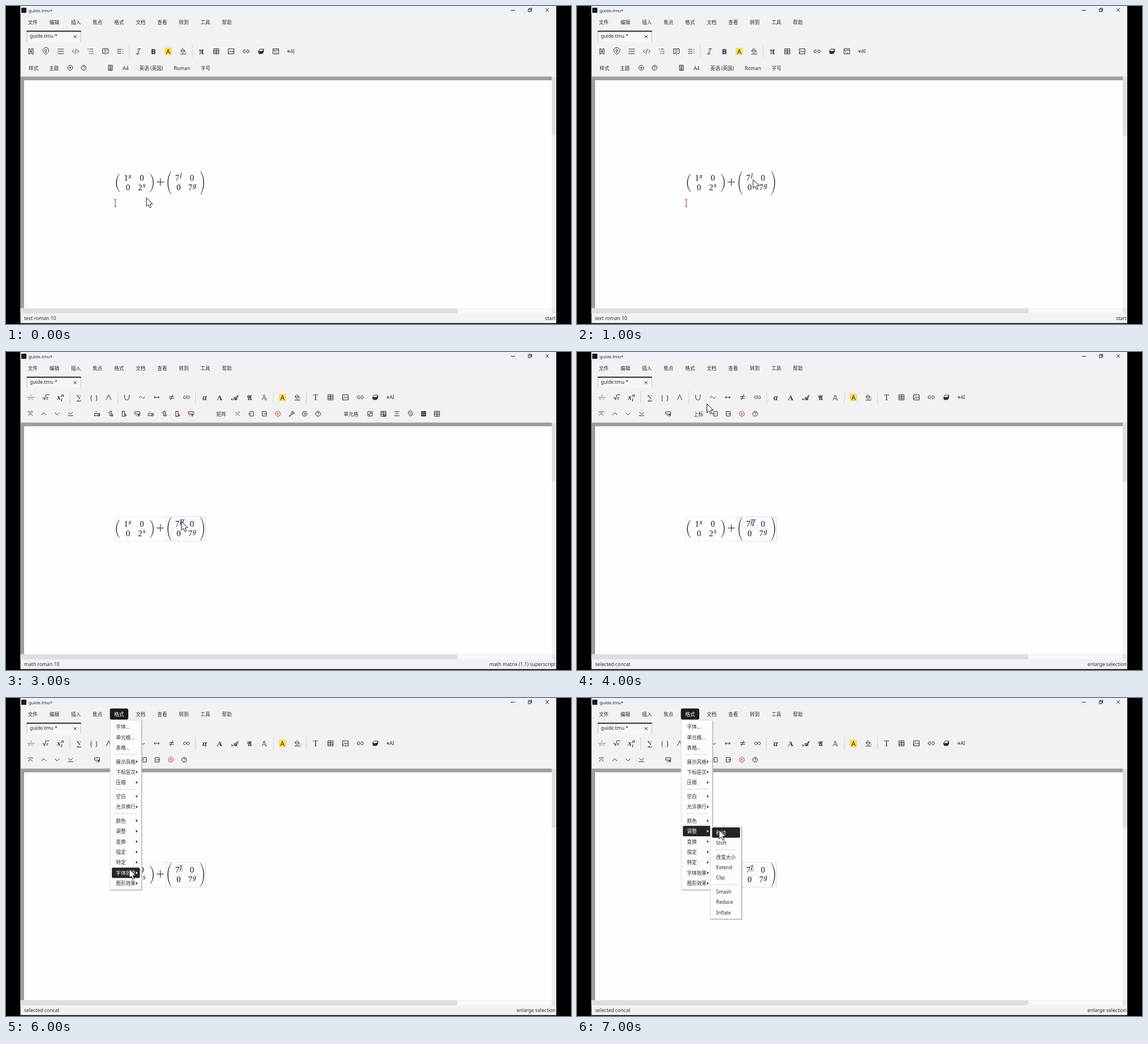
An HTML page with a canvas that plays this animation: 998 px wide and 561 px high, repeating every 8 s.

```html
<!DOCTYPE html>
<html lang="zh-CN">
<head>
<meta charset="utf-8">
<style>
  html, body { margin: 0; overflow: hidden; background: #000; }
  canvas { display: block; }
</style>
</head>
<body>
<canvas id="stage" width="998" height="561"></canvas>
<script>
const ctx = document.getElementById('stage').getContext('2d');
const UI = '"Noto Sans", "Noto Sans CJK SC", "Noto Sans CJK", sans-serif';
const SERIF = '"Liberation Serif", serif';
const INK = '#2b2a2d', CHROME = '#f2f1f3', RED = '#c8282d';

// Outline icons, drawn around their centre.
const ring = r => `M${r} 0a${r} ${r} 0 1 1-${2 * r} 0a${r} ${r} 0 1 1 ${2 * r} 0`;
const icons = {
  save: 'M-4-4.5h2.6v9h-2.6zM1.4-4.5h2.6v9h-2.6zM-1.4 0h2.8',
  pin: 'M0 5.7L-3.8 2A5.2 5.2 0 1 1 3.8 2ZM1.7-1.7a1.7 1.7 0 1 1-3.4 0a1.7 1.7 0 1 1 3.4 0M0 0v3',
  lines: 'M-5.5-4h11M-5.5 0h11M-5.5 4h11',
  code: 'M-3-3l-3 3 3 3M3-3l3 3-3 3M1.3-4.5l-2.6 9',
  tree: 'M-5-4h2M-1.5-4h6M-2.5 0h2M1 0h4M-2.5 4h2M1 4h4',
  comment: 'M-5-4.5h10v8h-3.5l-1.5 2-1.5-2h-3.5zM-2.5-2h5M-2.5 1h4',
  list: 'M-5.5-3.5h7.5M-5.5 0h7.5M-5.5 3.5h7.5M4-3.5h1.5M4 0h1.5M4 3.5h1.5',
  italic: 'M-1.5-4.5h6M-4.5 4.5h6M1.7-4.5l-3.4 9',
  paint: 'M-1-5l4.5 4.5-4 3.5-4-4zM-3.5-1h6.5M-5 4.8h10M4.5 1v1.5',
  table: 'M-4.5-4.5h9v9h-9zM-4.5-1.5h9M-4.5 1.5h9M0-4.5v9',
  image: 'M-5-4.5h10v9h-10zM-5 3l3.5-3.5 2 2 2-2.5 2.5 3M-2.5-2h1',
  link: 'M-1-2.5h-2a2.5 2.5 0 0 0 0 5h2M1-2.5h2a2.5 2.5 0 0 1 0 5h-2M-2.5 0h5',
  layers: 'M-2-4h7l-2.5 4h-7zM-4.5 0l1 4h6l2.5-4',
  term: 'M-5-4.5h10v9h-10zM-5-2h10M-2.5 0l1.5 1.2-1.5 1.2M.5 2.5h2',
  plus: ring(4.3) + 'M-2 0h4M0-2v4',
  help: ring(4.3) + 'M-1.4-1.2C-1.4-3 1.5-3 1.5-1.1C1.5 0 0 0 0 1.1M0 2v1',
  page: 'M-3.5-4.5h7v9h-7zM-2-2.5h4M-2-.5h4M-2 1.5h4M-2 3h4',
  wedge: 'M-4.2 4.5L0-4.5 4.2 4.5',
  cup: 'M-4-4.5v5a4 4 0 0 0 8 0v-5',
  sim: 'M-4.5 1C-3.5-3.5-.5-1 0 0S3.5 3.5 4.5-1',
  both: 'M-4.5 0h9M-2.5-2l-2 2 2 2M2.5-2l2 2-2 2',
  neq: 'M-4.2-1.5h8.4M-4.2 1.7h8.4M2.4-5l-4.8 10',
  inf: 'M0 0C-2-3.5-5-3-5 0S-2 3.5 0 0S5-3 5 0S2 3.5 0 0',
  top: 'M-4.5-3.3h9M-4 3l4-4 4 4',
  up: 'M-4.2 2l4.2-4 4.2 4',
  down: 'M-4.2-2l4.2 4 4.2-4',
  bottom: 'M-4.5 3.3h9M-4-3l4 4 4-4',
  rowUp: 'M-4.5-.5h9v4h-9zM-2.5-3.5h2',
  colLeft: 'M-1-4.5h3v8h-3zM-4.5-2h2',
  colRight: 'M-3-4.5h4v9h-4z',
  rowDown: 'M-4.5-3.5h9v4h-9zM-2.5 3.5h2',
  spark: 'M-3-3l6.5 6.5M-4-1l1-1M2-4l1 1M3-3l-2 2M-3.5 3l2-2',
  intoLeft: 'M-2-2v-2h6v8h-6v-2M-4.5 0h5M-2.5-1.5l-2 1.5 2 1.5',
  intoRight: 'M3-1.5v-2.5h-7v8h7v-2.5M-2 0h6.5M2.5-1.5l2 1.5-2 1.5',
  wrench: 'M-4 4l4.5-4.5a2.5 2.5 0 0 1 3-3.5l-1.5 2 1 1 2-1.5a2.5 2.5 0 0 1-3.5 3l-4.5 4.5z',
  gear: 'M-2.2-4h4.4l2.3 4-2.3 4h-4.4l-2.3-4z' + ring(1.5),
  expand: 'M-4-4h8v8h-8zM-2 2l4-4M0-2h2v2M-2 0v2h2',
  align: 'M-4.5-3.5h9M-3 0h6M-4.5 3.5h9',
  head: 'M-1 4.5v-3a3.5 3.5 0 1 1 4.5-3l1 2h-1v2h-2v2M-1.5-2h2v2',
  sqrt: 'M-6 .5l1.5-.8 2 4.8 2.5-9h6',
};
// Character icons: text and font.
const glyphs = {
  bold: ['B', `bold 13px ${UI}`],
  pi: ['π', `bold 16px ${SERIF}`],
  sum: ['∑', `12px "DejaVu Serif", serif`],
  brace: ['{ }', `13px ${SERIF}`],
  alpha: ['α', `italic bold 14px ${SERIF}`],
  boldA: ['A', `bold 13px ${SERIF}`],
  script: ['𝒜', `bold 12px ${SERIF}`],
  fraktur: ['𝔄', `bold 12px "DejaVu Sans", serif`],
  double: ['𝔸', `12px "DejaVu Sans", serif`],
  T: ['T', `14px ${SERIF}`],
};

function rect(x, y, w, h, fill, radius = 0) {
  ctx.fillStyle = fill;
  ctx.beginPath();
  ctx.roundRect(x, y, w, h, radius);
  ctx.fill();
}
function frame(x, y, w, h, color) {
  ctx.strokeStyle = color;
  ctx.lineWidth = 1;
  ctx.strokeRect(x, y, w, h);
}
function text(str, x, y, { font = `8.6px ${UI}`, color = INK, align = 'left' } = {}) {
  ctx.font = font;
  ctx.fillStyle = color;
  ctx.textAlign = align;
  ctx.fillText(str, x, y);
}
function path(d, x, y, stroke = INK, fill, width = 1) {
  const p = new Path2D(d);
  ctx.save();
  ctx.translate(x, y);
  ctx.lineWidth = width;
  if (fill) { ctx.fillStyle = fill; ctx.fill(p); }
  if (stroke) { ctx.strokeStyle = stroke; ctx.stroke(p); }
  ctx.restore();
}

// A trailing "+" or "-" adds a dark or red badge.
function icon(name, x, y) {
  const [base, badge] = name.split(/(?=[+-])/);
  if (base === 'mark') {
    rect(x - 6.5, y - 6.5, 13, 13, '#ffdf56');
    text('A', x, y + 4.6, { font: `12px ${UI}`, align: 'center' });
  } else if (base === 'ai') {
    path(ring(2.3), x - 3.8, y, null, '#3b9a91');
    text('AI', x - 1, y + 3, { font: `500 8.4px ${UI}` });
  } else if (base === 'cancel') {
    path(ring(4.3) + 'M-1.7-1.7l3.4 3.4M1.7-1.7l-3.4 3.4', x, y, RED);
  } else if (base === 'frac') {
    const small = { font: `italic 6px ${SERIF}`, color: '#77767a', align: 'center' };
    text('a', x, y - 1.7, small);
    path('M-6.5 0h13', x, y, '#77767a');
    text('b+c', x, y + 5.3, small);
  } else if (base === 'sub') {
    text('x', x - 6.5, y + 3.5, { font: `italic bold 13px ${SERIF}` });
    text('n', x + 1, y - .8, { font: `italic bold 9px ${SERIF}` });
    text('i', x + .5, y + 6.5, { font: `italic bold 9px ${SERIF}` });
  } else if (base === 'rows') {
    rect(x - 4.5, y - 4.5, 9, 9, INK, 1);
    path('M-4.5-1.5h9M-4.5 1.5h9', x, y, CHROME, null, .8);
  } else if (glyphs[base]) {
    const [char, font] = glyphs[base];
    text(char, x, y + 4.5, { font, align: 'center' });
  } else {
    path(icons[base], x, y);
    if (base === 'sqrt') text('x', x, y + 4, { font: `italic 10px ${SERIF}` });
    if (base === 'layers') path('M-4.5 0h7l2.5-4v4l-2.5 4h-6z', x, y, null, INK);
  }
  if (badge) {
    path(ring(2), x + 2.7, y + 2.5, null, badge === '+' ? INK : RED);
    path(badge === '+' ? 'M-1 0h2M0-1v2' : 'M-1 0h2', x + 2.7, y + 2.5, '#fff', null, .7);
  }
}
// "|" is a separator, "_" an empty slot.
function toolbar(names, x, y, pitch) {
  for (const name of names.split(' ')) {
    if (name === '|') {
      path('M0-11v22', x - 10.3, y, '#d2d1d4');
      x += 5.9;
      continue;
    }
    if (name !== '_') icon(name, x, y);
    x += pitch;
  }
}

function drawWindow(step) {
  rect(0, 0, 998, 561, '#000');
  rect(25.5, 0, 946.5, 559.5, CHROME);
  rect(25.5, 0, 946.5, 14, '#eff1f9');
  rect(27, 3, 9, 9, '#18181a', 1);
  text('guide.tmu*', 40, 11, { font: `7.8px ${UI}` });
  path('M-4 0h7.5', 895.5, 7.5);
  path('M-3-1.5h4.5v4.5h-4.5zM-1.5-1.5v-1.5h4.5v4.5h-1.5', 925.5, 7);
  path('M-3-3l6 6M3-3l-6 6', 956, 7);

  '文件 编辑 插入 焦点 格式 文档 查看 转到 工具 帮助'.split(' ').forEach((label, i) => {
    const open = i === 4 && step >= 5;
    if (open) rect(183.5, 18.5, 32.5, 19.5, '#1c1b1d', 3);
    text(label, 38.7 + 38.1 * i, 32, { color: open ? '#fff' : INK });
  });

  rect(37, 44, 95, 19.5, '#f6f5f7');
  path('M0 0v19.5M95 0v19.5', 37, 44, '#c3c2c6');
  rect(36.5, 43.5, 96, 2, '#28252e');
  text('guide.tmu *', 42, 56.3);
  path('M-2.6-2.6l5.2 5.2M2.6-2.6l-5.2 5.2', 122, 54);

  if (step < 3) {
    toolbar('save pin lines code tree comment list | italic bold mark paint | pi table image link layers term ai', 44, 80, 26.3);
    toolbar('plus help _ page', 113.5, 109, 23.65);
    [['样式', 40], ['主题', 76], ['A4', 206], ['英语 (英国)', 235.5], ['Roman', 296.5], ['字号', 344]]
      .forEach(([label, x]) => text(label, x, 112.6));
  } else {
    toolbar('frac sqrt sub | sum brace wedge | cup sim both neq inf | alpha boldA script fraktur double | mark paint | T table image link layers ai', 44, 80, 26.3);
    toolbar('top up down bottom', 43, 109, 23.65);
    if (step === 3) {
      toolbar('rowUp+ colLeft+ colRight+ rowDown+ rowUp- colLeft- colRight- rowDown-', 161, 109, 23.65);
      text('矩阵', 371.5, 112.6);
      toolbar('spark intoLeft intoRight cancel wrench gear help', 409.3, 109, 23.65);
      text('单元格', 596.5, 112.6);
      toolbar('expand table+ align head rows table', 643, 109, 23.65);
    } else {
      icon('rowDown+', 161, 109);
      text('上标', 206, 112.6);
      toolbar('intoLeft intoRight cancel help', 243.8, 109, 23.65);
    }
  }

  rect(25.5, 124.5, 938.5, 409, '#9e9da0');
  rect(32, 131, 932, 402.5, '#fffeff');
  rect(964, 125, 8, 103.5, '#dedddf', 2);
  rect(25.5, 533.5, 938.5, 8.5, '#f8f7f9');
  rect(25.5, 533.5, 772, 8.5, '#dedddf', 2);
  rect(964, 533.5, 8, 8.5, '#e4e3e5');
  const [left, right] = step < 3 ? ['text roman 10', 'start']
    : step === 3 ? ['math roman 10', 'math matrix (1,1) superscript']
    : ['selected concat', 'enlarge selection'];
  text(left, 32, 554.3);
  text(right, 970.8, 554.3, { align: 'right' });
}

function paren(x, top, bottom, dir) {
  const h = bottom - top;
  const side = (bow, from, to) => `C${-bow * dir} ${h * from} ${-bow * dir} ${h * to} `;
  path(`M0 0${side(8.2, .27, .73)}0 ${h}${side(7, .73, .27)}0 0`, x, top, '#111', '#111', .4);
}
function drawFormula(step) {
  if (step >= 2) {
    frame(192.5, 290.5, 159.5, 43, '#e4eef2');
    frame(293.5, 294.5, 47.5, 34.5, '#e2f1f4');
    path('M0 0v34.5M-23.5 18h47.5', 317, 294.5, '#e2f1f4');
    frame(283, 290.5, 69, 43, step === 2 ? '#68d8dd' : '#d3dfe6');
  }
  if (step === 3) rect(306, 295.5, 7, 11, '#b5eef2');
  if (step >= 4) {
    rect(306, 295.5, 5.5, 10.5, '#fbf3e6');
    frame(306, 295.5, 5.5, 10.5, '#d9a596');
  }
  paren(200.7, 296, 328, 1);
  paren(254.5, 296, 328, -1);
  paren(291.7, 291.5, 332.5, 1);
  paren(343.5, 291.5, 332.5, -1);
  path('M-6.5 0h13M0-6.5v13', 272.5, 310.5, '#222');
  const digit = { font: `14.8px ${SERIF}`, color: '#111', align: 'center' };
  const power = { font: `italic 12px ${SERIF}`, color: '#111', align: 'center' };
  [['1', 212, 308], ['0', 240, 308], ['0', 215.5, 325], ['2', 237, 325],
   ['7', 302.5, 308], ['0', 328.5, 308], ['0', 305, 325], ['7', 325.5, 325]]
    .forEach(([s, x, y]) => text(s, x, y, digit));
  [['x', 219, 303.5], ['s', 244, 320], ['l', 308.7, 304], ['g', 333, 320]]
    .forEach(([s, x, y]) => text(s, x, y, power));

  if (step < 2) path('M-2 0h4M-2 12.5h4M0 0v12.5', 193, 341.5, '#b8403c', null, 1.2);
  if (step === 2) path('M-1 0h4M-3 15h4M1 0l-2 15', 311, 296.5, '#9a48a6', null, 1.5);
  if (step === 3 || step === 4) path('M-1 0h4M-4 10h4M1.3 0l-3 10', 312.5, 296, '#9141b5', null, 1.6);
}

// Items are 18.4 px apart; "-" is a rule, ">" marks a submenu.
function popup(items, x, y, w, h, firstY, active) {
  rect(x + 1, y + 1, w + .5, h + .5, '#aaa9ac');
  rect(x, y, w, h, '#fdfcfd');
  frame(x, y, w, h, '#d8d7da');
  let cy = firstY;
  for (const item of items.split(' ')) {
    if (item === '-') {
      path(`M8 0h${w - 16}`, x, cy - 6.5, '#d8d7da');
      cy += 6.1;
      continue;
    }
    const label = item.replace('>', ''), on = label === active;
    const color = on ? '#fff' : INK;
    if (on) rect(x + 3, cy - 9.3, w - 5.5, 18.4, '#252427', 2);
    text(label, x + 10.3, cy + 3.2, { color });
    if (item !== label) path('M-1.3-2.5l3 2.5-3 2.5z', x + 47, cy, null, color);
    cy += 18.4;
  }
}

// One pointer position per second.
const pointer = [[248, 338], [311, 306], [312, 299], [310, 299], [229.5, 91.5], [192.5, 27], [218, 302], [251, 233]];

function draw() {
  const step = Math.floor(performance.now() % 8000 / 1000);
  drawWindow(step);
  drawFormula(step);
  if (step >= 5) {
    popup('字体... 单元格... 表格... - 展示风格> 下标层次> 压缩> - 空白> 允许换行> - 颜色> 调整> 变换> 指定> 特定> 字体效果> 图形效果>',
      184, 39, 55, 299, 51, [, '字体效果', '调整'][step - 5]);
  }
  if (step === 7) popup('移动 Shift - 改变大小 Extend Clip - Smash Reduce Inflate', 235.5, 226.5, 55, 163, 237.5, '移动');
  path('M0 0V15.5L3.5 12.3 6 17.8 8.6 16.6 6.2 11.3 11 11Z', ...pointer[step], '#111', '#fff');
  requestAnimationFrame(draw);
}
draw();
</script>
</body>
</html>
```
